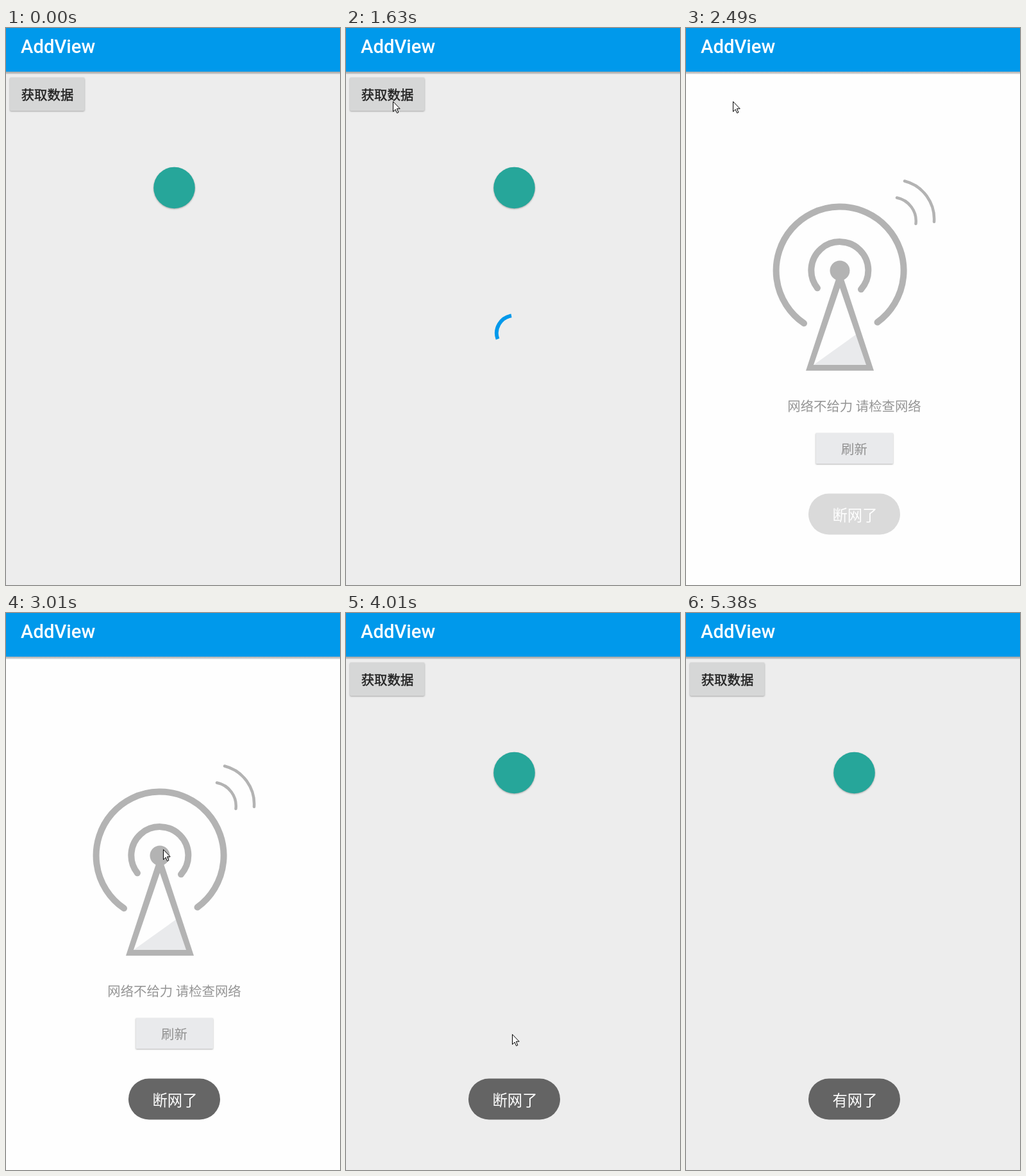
An HTML page that plays this animation: 521 by 868 pixels, repeating every 5840 ms.

```html
<!DOCTYPE html>
<html lang="zh-CN">
<head>
<meta charset="utf-8">
<title>AddView</title>
<style>
  html, body { margin: 0; width: 100%; height: 100%; overflow: hidden; background: #ededed; }
  svg { display: block; width: 521px; height: 868px; }
  text { font-family: 'Noto Sans CJK SC', 'Noto Sans CJK', sans-serif; font-size: 20.4px; text-anchor: middle; }
  .title { font: 500 29.2px Roboto, sans-serif; text-anchor: start; fill: #fff; }
  .label { fill: #212121; stroke: #212121; stroke-width: .45px; }
  .toast text { font-size: 23.3px; fill: #fff; }
  .raised { filter: drop-shadow(0 1px 1px rgba(0, 0, 0, .3)); }
  .pressed { filter: drop-shadow(0 3px 2.5px rgba(0, 0, 0, .4)); }
  .line { fill: none; stroke: #b3b3b3; stroke-linecap: round; }
</style>
</head>
<body>
<svg viewBox="0 0 521 868">
  <defs>
    <linearGradient id="shade" x2="0" y2="1">
      <stop offset="0" stop-opacity=".3"/>
      <stop offset=".5" stop-opacity=".22"/>
      <stop offset="1" stop-opacity="0"/>
    </linearGradient>
    <clipPath id="btnClip"><rect x="6" y="77" width="116.5" height="52" rx="2"/></clipPath>
    <rect id="pill" x="191" y="725.5" width="143" height="64" rx="32" fill="#515151" fill-opacity=".88"/>
  </defs>

  <g id="home">
    <rect width="521" height="868" fill="#ededed"/>
    <rect id="btn" class="raised" x="6" y="77" width="116.5" height="52" rx="2" fill="#d6d7d7"/>
    <circle id="ripple" cx="73" cy="114" clip-path="url(#btnClip)"/>
    <text class="label" x="64.5" y="111.6">获取数据</text>
    <circle class="raised" cx="262.5" cy="249" r="32.3" fill="#26a69a"/>
    <path id="spinner" fill="none" stroke="#0099eb" stroke-width="5.8"/>
  </g>

  <g id="offline">
    <rect width="521" height="868" fill="#fefefe"/>
    <path class="line" stroke-width="10" d="M184 460.2A99.5 99.5 0 1 1 298.5 458.6M205 405.3A44.5 44.5 0 1 1 273 407.3"/>
    <path class="line" stroke-width="4.5" d="M329 264.5A37 37 0 0 1 358.5 305M341 238.5A61.3 61.3 0 0 1 387 302"/>
    <path fill="#e9eaec" d="M199 525L266 477L281 525Z"/>
    <path fill="#b3b3b3" fill-rule="evenodd" d="M187 534L235 388H245L293 534ZM240 405L199 525H281Z"/>
    <circle cx="240" cy="378" r="15.5" fill="#b3b3b3"/>
    <text x="262.5" y="597" fill="#959595">网络不给力 请检查网络</text>
    <rect class="raised" x="202.5" y="631" width="120.5" height="48" rx="1" fill="#e9eaec"/>
    <text x="262.5" y="663.6" fill="#8f8f8f">刷新</text>
  </g>

  <rect width="521" height="68" fill="#0099eb"/>
  <rect y="68" width="521" height="4.5" fill="url(#shade)"/>
  <text class="title" x="23" y="39">AddView</text>

  <g id="lost" class="toast"><use href="#pill"/><text x="263.5" y="767.6">断网了</text></g>
  <g id="found" class="toast"><use href="#pill"/><text x="263.5" y="767.6">有网了</text></g>

  <path id="cursor" fill="#fff" stroke="#000" d="M.5 .7V16.3L4.1 12.9L6.6 18.5L8.9 17.5L6.4 11.8H11.2Z"/>
</svg>

<script>
const LOOP = 5840;
const STEP = 138.5;
const $ = id => document.getElementById(id);

const ramp = (t, start, length) => Math.min(1, Math.max(0, (t - start) / length));
const easeIn = power => p => p ** power;
const easeOut = power => p => 1 - (1 - p) ** power;
const smooth = p => p * p * (3 - 2 * p);

// Pointer strokes; x and y ease apart, which bends the path.
const strokes = [
  { start: 400, end: 1240, from: [500, 518], to: [73, 114], ease: [easeOut(2.67), easeOut(3.09)] },
  { start: 2620, end: 3480, from: [73, 114], to: [259, 656], ease: [easeOut(4), smooth] },
  { start: 4400, end: 5245, from: [259, 656], to: [455, 845], ease: [smooth, easeIn(1.6)] }
];

function pointerAt(t) {
  const { start, end, from, to, ease } = strokes.findLast(s => s.start <= t) || strokes[0];
  const p = ramp(t, start, end - start);
  return from.map((a, i) => Math.round(a + (to[i] - a) * ease[i](p)));
}

// The arc turns steadily, shrinks onto its head, then grows from its tail.
function arcPath(t) {
  const spin = 143 + 0.35 * (t - 2339);
  const turn = t - 1720;
  const sweep = 273 * Math.min(1, Math.abs(turn) / 200);
  const tail = turn < 0 ? spin - sweep : spin;
  const at = deg => {
    const a = deg * Math.PI / 180;
    return `${262.5 + 27.6 * Math.cos(a)} ${475.5 + 27.6 * Math.sin(a)}`;
  };
  return `M${at(tail)}A27.6 27.6 0 ${sweep > 180 ? 1 : 0} 1 ${at(tail + sweep)}`;
}

function show(id, on) {
  $(id).style.display = on ? '' : 'none';
}

function draw(time) {
  const t = 400 + STEP * Math.floor((time - 378) / STEP);

  const offline = t > 2470 && t < 3990;
  show('home', !offline);
  show('offline', offline);

  show('spinner', t > 1500 && t < 2470);
  $('spinner').setAttribute('d', arcPath(t));

  const press = t > 1360 ? 1 - ramp(t, 1360, 260) : 0;
  $('ripple').setAttribute('r', 100 - 55 * press);
  $('ripple').setAttribute('opacity', 0.13 * press);
  $('btn').setAttribute('class', press ? 'pressed' : 'raised');

  $('lost').setAttribute('opacity', ramp(t, 2447, 130) - ramp(t, 4330, 140));
  $('found').setAttribute('opacity', ramp(t, 4385, 130));

  show('cursor', t > 390 && t < 5380);
  $('cursor').setAttribute('transform', `translate(${pointerAt(t)})`);
}

const begin = performance.now();
function tick() {
  draw((performance.now() - begin) % LOOP);
  requestAnimationFrame(tick);
}
tick();
</script>
</body>
</html>
```
